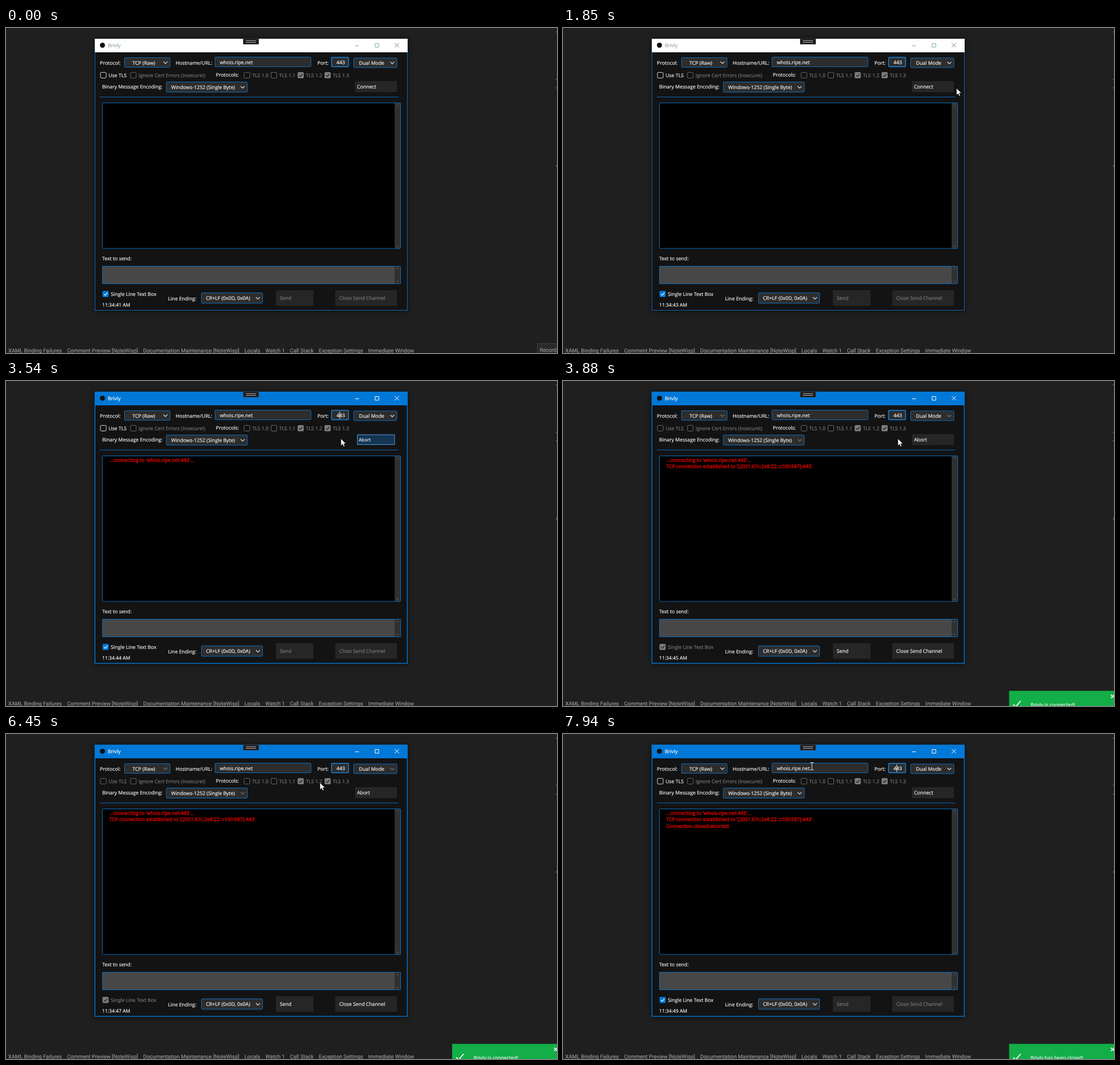
Animation, 974 px wide and 575 px high, one loop 8 s. Source, as an HTML page:

```html
<!DOCTYPE html>
<html lang="en">
<head>
<meta charset="utf-8">
<title>Brivly</title>
<style>
html, body { margin: 0; width: 100%; height: 100%; overflow: hidden; background: #1f1f1f; }
svg { display: block; width: 974px; height: 575px; }
text { font: 8.8px "Open Sans", "Noto Sans", sans-serif; color: #f5f5f5; fill: currentColor;
  stroke: currentColor; stroke-width: .18; text-rendering: geometricPrecision; white-space: pre; }
.bar { font: 9.46px Roboto, sans-serif; color: #a2a2a2; stroke-width: .08; }
.log { color: #f00; font-size: 8.72px; stroke-width: .3; }
.clock { font-size: 8.6px; }
.line { fill: none; }
.field { fill: #2d2d2d; stroke: #0a6cbd; }
.btn { fill: #262626; }
.chev { fill: none; stroke: #e0e0e0; stroke-width: 1.1; }
.box { fill: #111; stroke: #d8d8d8; }
.tick { fill: none; stroke: #fff; stroke-width: 1.2; }
.on .box { fill: #0078d7; stroke: #0078d7; }
.off text, .live .idle text, svg:not(.live) .send { color: #7b7b7b; }
.off .box, .live .idle .box { stroke: #686868; }
.off.on .box, .live .idle.on .box { fill: #7c7c7c; stroke: #7c7c7c; }
.off .tick, .live .idle .tick { stroke: #1c1c1c; }
.live .idle .chev { stroke: #777; }
#stage .combo text { color: #f5f5f5; }
.frame { fill: #131314; stroke: #0a6cbd; filter: drop-shadow(0 1px 5px #0009); }
.title { fill: #fff; }
.name { color: #8fa898; }
.sys { fill: none; stroke: #7fae98; }
.close { stroke: #777; }
.active .frame { stroke: #0078d7; stroke-width: 1.4; }
.active .title { fill: #0078d7; }
.active .name { color: #fff; }
.active .sys { stroke: #fff; }
</style>
</head>
<body>
<svg id="stage" viewBox="0 0 974 575"></svg>
<script>
const LOOP = 8000, APP = 'Brivly', ADDON = 'NoteWisp';
const ACTIVATE = 3120, CLICK = 3190, OPEN = 3680, CLOSE = 7270;
const stage = document.getElementById('stage');

// y is the middle of the capitals
const text = (x, y, s, cls = '', id = '') =>
  `<text x="${x}" y="${y + 3.2}" class="${cls}" id="${id}">${s}</text>`;
const rect = (x, y, x2, y2, attrs) =>
  `<rect x="${x}" y="${y}" width="${x2 - x}" height="${y2 - y}" ${attrs}/>`;
const path = (d, attrs) => `<path d="${d}" ${attrs}/>`;
const field = (x, y, x2, y2, attrs = '') =>
  rect(x + .5, y + .5, x2 - .5, y2 - .5, `rx="1.5" class="field" ${attrs}`);
const combo = (x, y, x2, y2, tx, label, cls = '') => {
  const mid = (y + y2) / 2;
  return `<g class="combo ${cls}">${field(x, y, x2, y2)}${text(tx, mid + .3, label)}
    ${path(`M${x2 - 12.2} ${mid - 1.5}l3.5 3.5l3.5 -3.5`, 'class="chev"')}</g>`;
};
const check = (x, y, label, cls = '') =>
  `<g class="${cls}">${rect(x + .5, y - 5, x + 10.5, y + 5, 'rx="1.5" class="box"')}
   ${/\bon\b/.test(cls) ? path(`M${x + 2.7} ${y + .2}l2.1 2.2l4 -4.4`, 'class="tick"') : ''}
   ${text(x + 14.7, y + .5, label)}</g>`;
const button = (x, x2, label) =>
  rect(x, 464, x2, 491.5, 'class="btn"') + text(x + 7, 477.7, label, 'send');
const panel = (y, y2, fill) =>
  rect(170, y, 697.5, y2, `fill="${fill}"`) + rect(687, y, 697.5, y2, 'fill="#303030"') +
  path(`M690 ${y + 5.5}l2 -2l2 2M690 ${y2 - 5.5}l2 2l2 -2`, 'class="line" stroke="#666"') +
  rect(170.5, y + .5, 697.5, y2 - .5, 'rx="1.5" class="line" stroke="#0a6cbd"');

const tabs = ['XAML Binding Failures', `Comment Preview [${ADDON}]`,
  `Documentation Maintenance [${ADDON}]`, 'Locals', 'Watch 1', 'Call Stack',
  'Exception Settings', 'Immediate Window'];
const log = ["...connecting to 'whois.ripe.net:443'...",
  "TCP connection established to '[2001:67c:2e8:22::c100:687]:443'.",
  'Connection closed/aborted.'];

stage.innerHTML = [
  rect(0, 0, 974, 575, 'fill="#1f1f1f"'),
  path('M972 7h2M972 91h2M972 106h2M974 242q-2 2 0 4', 'class="line" stroke="#8a8a8a"'),
  text(4, 571.2, tabs.map((s, i) => `<tspan dx="${i && 9.2}">${s}</tspan>`).join(''), 'bar'),
  `<g id="record">${rect(939.5, 558.5, 980, 580, 'fill="#292929" stroke="#444"')}
   ${text(943.5, 569.5, 'Record', 'bar')}</g>`,

  rect(157.3, 19.5, 709.4, 499.5, 'class="frame"'),
  rect(157, 19, 710, 43, 'class="title"'),
  '<circle cx="170.5" cy="30.5" r="4.5" fill="#111"/>',
  text(180, 31, APP, 'name'),
  path('M617 31.5h7M652.5 27.5h6.5v6.5h-6.5z', 'class="sys"'),
  path('M687.2 26.7l7.6 7.6m0 -7.6l-7.6 7.6', 'class="sys close"'),
  rect(419.5, 19.5, 446.5, 28.5, 'fill="#1c1c1c" stroke="#3a3a3a"'),
  path('M424 22.5h18M424 25.5h18', 'class="line" stroke="#b5b5b5"'),

  text(166, 61.3, 'Protocol:'),
  combo(209, 52, 290.5, 70, 223.5, 'TCP (Raw)', 'idle'),
  text(300, 61.3, 'Hostname/URL:'),
  field(369, 51, 539.5, 69), text(378, 60.7, 'whois.ripe.net'),
  text(550.5, 61.3, 'Port:'),
  field(575, 51.5, 606, 69, 'style="stroke:#1684e0;stroke-width:1.5"'),
  text(584.3, 60.7, '443'),
  path('M590 54v13', 'id="caret" class="line" stroke="#fff"'),
  combo(614, 52.5, 691.5, 70.5, 624, 'Dual Mode', 'idle'),
  check(166.5, 83.5, 'Use TLS', 'idle'),
  check(219.5, 83.5, 'Ignore Cert Errors (Insecure!)', 'off'),
  text(371, 83, 'Protocols:'),
  [0, 1, 2, 3].map(i => check(420.5 + 47.5 * i, 83.5, 'TLS 1.' + i, i > 1 ? 'off on' : 'off')).join(''),
  text(170, 103.3, 'Binary Message Encoding:'),
  combo(283, 95, 427, 114, 292, 'Windows-1252 (Single Byte)', 'idle'),
  `<g id="go">${rect(617, 94, 691, 113.5, 'class="btn"')}
   ${rect(617.5, 94.5, 690.5, 113, 'id="glow" fill="#143655" stroke="#5aa5e6"')}
   ${text(620.5, 103.7, '', '', 'goText')}</g>`,
  path('M166 122h527.5', 'class="line" stroke="#0a6cbd"'),

  panel(132, 390.5, '#000'),
  log.map((s, i) => text(182.5, 139.5 + 11.5 * i, s, 'log', 'log' + i)).join(''),
  text(170, 408, 'Text to send:'),
  panel(421, 453, '#474747'),
  check(170.5, 470.5, 'Single Line Text Box', 'idle on'),
  text(170, 490, '', 'clock', 'clock'),
  text(286.5, 478.3, 'Line Ending:'),
  combo(345, 468, 454, 487.5, 353.5, 'CR+LF (0x0D, 0x0A)'),
  button(477, 543.5, 'Send'),
  button(582, 691, 'Close Send Channel'),

  `<g id="toast">${rect(788.6, 548.2, 974, 575, 'fill="#13ae47"')}
   ${path('M796 572l4 4.5l9 -10.5', 'class="line" stroke="#fff" stroke-width="1.8"')}
   ${path('M968.5 555l6 6m0 -6l-6 6', 'class="line" stroke="#fff" stroke-width="1.5"')}
   ${text(826.5, 572.6, '', '', 'toastText')}</g>`,
  `<g id="cursor">
   ${path('M0 0v12.4l2.9 -2.7l1.9 4.4l2.1 -.9l-1.9 -4.3h3.9z', 'id="arrow" fill="#fff" stroke="#000" stroke-width=".6"')}
   ${path('M-3 -6.5h2q1 0 1 1q0 -1 1 -1h2M0 -5.5v11M-3 6.5h2q1 0 1 -1q0 1 1 1h2', 'id="beam" class="line" stroke="#eee"')}</g>`
].join('');

const el = {};
stage.querySelectorAll('[id]').forEach(n => { if (n.id) el[n.id] = n; });

const ramp = (t, from, to) => Math.min(1, Math.max(0, (t - from) / (to - from)));
const smooth = u => u * u * (3 - 2 * u);
// Rises after `on`, falls after `off`
const pulse = (t, on, off) => ramp(t, on, on + 150) - ramp(t, off, off + 250);

// Pointer strokes: start and end in ms, end point
const ENTER = { x: 948, y: 553 };
const strokes = [
  [660, 2240, 635, 102],
  [3400, 3540, 592, 102],
  [4350, 4800, 451, 57],
  [5340, 5750, 402, 49],
  [5750, 6140, 446, 61],
  [6310, 6450, 555, 86],
  [6450, 6780, 636, 101],
  [CLOSE, 7940, 440, 57]
];

// The hand rises early and moves sideways late
function pointer(t) {
  let { x, y } = ENTER;
  for (const [from, to, tx, ty] of strokes) {
    const u = ramp(t, from, to);
    x += (tx - x) * smooth(u ** 1.17);
    y += (ty - y) * (1 - (1 - u) ** 3.3);
  }
  return { x, y };
}

const show = (node, on) => { node.style.visibility = on ? 'visible' : 'hidden'; };

function render(t) {
  const closed = t >= CLOSE, live = t >= OPEN && !closed;
  stage.classList.toggle('active', t >= ACTIVATE);
  stage.classList.toggle('live', live);
  el.record.style.opacity = 1 - ramp(t, 0, 140) ** 2;
  el.clock.textContent = `11:34:${41 + Math.floor((t + 160) / 1000)} AM`;
  show(el.caret, t >= ACTIVATE && !live);
  [CLICK, OPEN, CLOSE].forEach((at, i) => show(el['log' + i], t >= at));

  el.goText.textContent = t >= CLICK && !closed ? 'Abort' : 'Connect';
  el.glow.style.opacity = pulse(t, 1850, 3540) + pulse(t, 6600, 7400);
  const press = pulse(t, CLICK, 3540) + pulse(t, 7200, 7400);
  el.go.setAttribute('transform',
    `translate(654 103.75) scale(${1 - .1 * press} ${1 - .06 * press}) translate(-654 -103.75)`);

  el.toast.style.opacity = ramp(t, OPEN, OPEN + 200);
  el.toastText.textContent = APP + (closed ? ' has been closed!' : ' is connected!');

  const { x, y } = pointer(t);
  const beam = !live && x > 369 && x < 539 && y > 51 && y < 69;
  el.cursor.setAttribute('transform', `translate(${x} ${y})`);
  show(el.arrow, t >= strokes[0][0] && !beam);
  show(el.beam, beam);
}

const begin = performance.now();
function frame() {
  render((performance.now() - begin) % LOOP);
  requestAnimationFrame(frame);
}
frame();
</script>
</body>
</html>
```
